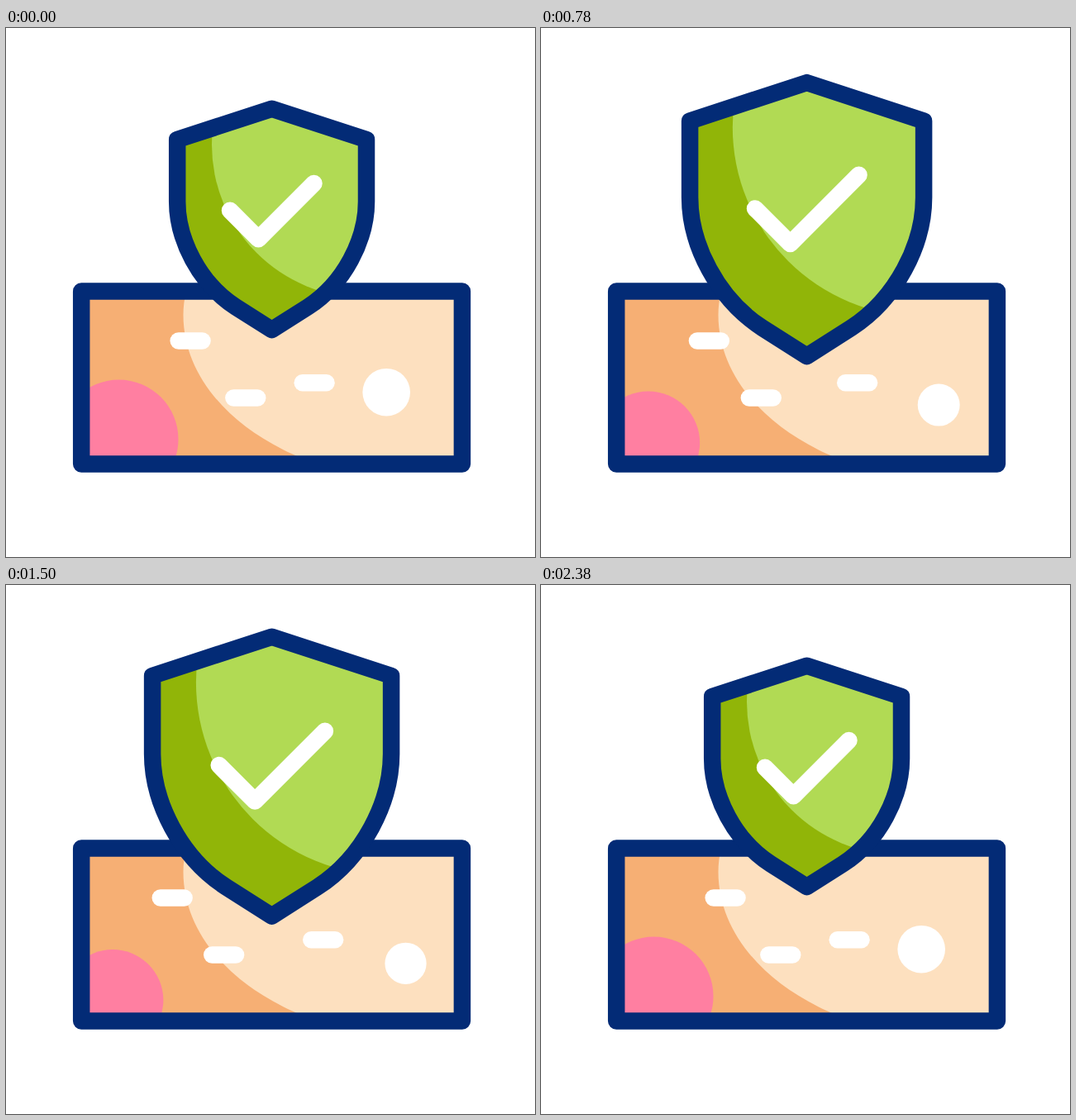
An HTML page without scripts that plays this animation: 640x640 px, repeating every 2400 ms.

```html
<!DOCTYPE html>
<html lang="en">
<head>
<meta charset="utf-8">
<title>Protected banknote</title>
<style>
  @property --p { syntax: "<number>"; inherits: true; initial-value: 0; }

  html, body { margin: 0; width: 100%; height: 100%; overflow: hidden; background: #fff; }

  svg {
    display: block; width: 100%; height: 100%;
    animation: pulse 2400ms cubic-bezier(.5, 0, .5, 1) infinite;
  }

  /* --p drives every part: 0 = small shield, 1 = large shield */
  @keyframes pulse {
    0%, 99.1667%, 100% { --p: 0; }
    49.1667% { --p: 1; }
  }

  .outline { fill: none; stroke: #032b76; stroke-linejoin: round; }
  .white { fill: none; stroke: #fff; stroke-linecap: round; stroke-linejoin: round; }
  .note { stroke-width: 20.5px; }

  .shield {
    --s: calc(1 + .3 * var(--p));
    transform-origin: 321.6px 231px;
    transform: scale(var(--s));
    stroke-width: calc(20.5px / var(--s));
  }

  .dash { transform: translateX(calc(var(--dx) * var(--p))); }

  .pink {
    fill: #ff7fa1;
    cx: calc(136.5px - 8.5px * var(--p));
    cy: calc(497.5px + 5.5px * var(--p));
    r: calc(72px - 12.2px * var(--p));
  }

  .coin {
    fill: #fff;
    cx: calc(460.2px + 26.6px * var(--p));
    cy: calc(440.7px + 19.5px * var(--p));
    r: calc(28.8px - 4.2px * var(--p));
  }
</style>
</head>
<body>
<svg viewBox="0 0 640 640">
  <defs>
    <path id="shield" d="M321.6 97.7 L436 135.1 V210 C436 256 409.2 309 365.2 337.5 L321.6 365.2 L278 337.5 C234 309 207.2 256 207.2 210 V135.1 Z"/>
    <clipPath id="inShield"><use href="#shield"/></clipPath>
    <clipPath id="inNote"><rect x="91.2" y="318.4" width="460.7" height="209"/></clipPath>
  </defs>

  <g class="note">
    <g clip-path="url(#inNote)">
      <rect x="91" y="318" width="461" height="210" fill="#f6af74"/>
      <path fill="#fde0bf" d="M218 318 Q214.5 333 214.5 347 C214.5 420 270 482 350 517 L375 528 H552 V318 Z"/>
      <circle class="pink"/>
    </g>
    <circle class="coin"/>
    <g class="white">
      <path class="dash" style="--dx: -25px" d="M208.7 378.4 h28.8"/>
      <path class="dash" style="--dx: -29.8px" d="M275.4 447.5 h28.8"/>
      <path class="dash" style="--dx: 12.1px" d="M358.7 429.2 h28.8"/>
    </g>
    <rect class="outline" x="91.2" y="318.4" width="460.7" height="209"/>
  </g>

  <g class="shield">
    <use href="#shield" fill="#91b508"/>
    <g clip-path="url(#inShield)">
      <circle cx="434" cy="141.3" r="185" fill="#b1da54"/>
    </g>
    <path class="white" d="M271 220.8 L305.4 255.2 L372.5 188"/>
    <use class="outline" href="#shield"/>
  </g>
</svg>
</body>
</html>
```
